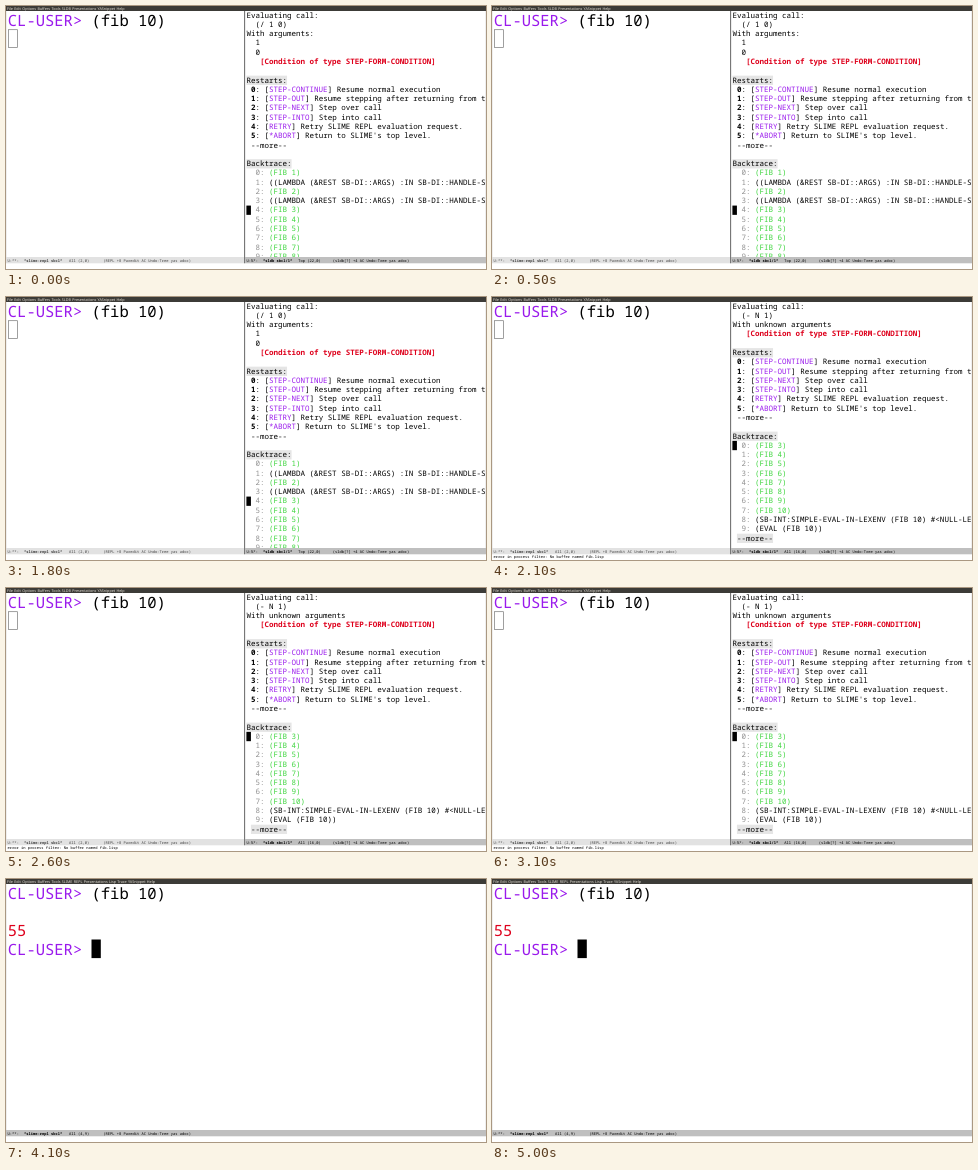
Recreate the animation shown at these times as an HTML page. Size 480 px wide and 263 px high, loop 5100 ms.

```html
<!DOCTYPE html>
<html lang="en">
<head>
<meta charset="utf-8">
<title>Stepping through fib</title>
<style>
  html, body { margin: 0; width: 100%; height: 100%; overflow: hidden; background: #fff; }
  svg { display: block; width: 480px; height: 263px; }
  text { font-family: "Noto Sans Mono", "DejaVu Sans Mono", monospace; text-rendering: geometricPrecision; fill: #000; }
  .repl { font-size: 15.5px; }
  .pane { font-size: 7.53px; }
  .mode { font-size: 3.75px; }
  .menu { font-family: "Noto Sans", "Open Sans", sans-serif; font-size: 3.72px; word-spacing: 0.35px; fill: #dfdbd2; }
  .bold { font-weight: 600; }
  .purple { fill: #9a1aec; }
  .red { fill: #de001c; }
  .green { fill: #3fd53f; }
  .gray { fill: #909090; }
  .dim { fill: #444; }

  .scene { visibility: hidden; animation: 5100ms step-end infinite; }
  #call { animation-name: call; }
  #args { animation-name: args; }
  #done { animation-name: done; }
  @keyframes call { 0% { visibility: visible } 41.17% { visibility: hidden } }
  @keyframes args { 0% { visibility: hidden } 41.17% { visibility: visible } 64.7% { visibility: hidden } }
  @keyframes done { 0% { visibility: hidden } 64.7% { visibility: visible } }
</style>
</head>
<body>
<svg viewBox="0 0 480 263">
  <defs><clipPath id="edge"><rect x="240" y="4" width="239" height="247"/></clipPath></defs>
  <rect width="480" height="263" fill="#fff"/>
  <g id="call" class="scene"></g>
  <g id="args" class="scene"></g>
  <g id="done" class="scene"></g>
</svg>
<script>
const TOP = 4.7;
const REPL = { x: 1.8, adv: 9.3, pitch: 18.6, base: 15, cls: 'repl' };
const PANE = { x: 240.4, adv: 4.518, pitch: 9.28, base: 6.9, cls: 'pane' };

function add(parent, tag, attrs, content) {
  const el = document.createElementNS('http://www.w3.org/2000/svg', tag);
  for (const key in attrs) el.setAttribute(key, attrs[key]);
  if (content) el.textContent = content;
  return parent.appendChild(el);
}

const rect = (g, x, y, width, height, fill, more) =>
  add(g, 'rect', { x, y, width, height, fill, ...more });

const label = (g, x, y, str, cls) => add(g, 'text', { x, y, class: cls }, str);

// Places text on a character grid.
const put = (g, grid, col, row, str, cls = '') =>
  label(g, grid.x + col * grid.adv, TOP + row * grid.pitch + grid.base, str, grid.cls + ' ' + cls);

// Fills a run of character cells.
const cells = (g, grid, col, row, count, fill) =>
  rect(g, grid.x + col * grid.adv, TOP + row * grid.pitch, count * grid.adv, grid.pitch, fill);

function menuBar(g, modeMenus) {
  rect(g, 0, 0, 480, 5, '#3c3b37');
  label(g, 1, 3.8, `File Edit Options Buffers Tools ${modeMenus} YASnippet Help`, 'menu');
}

function modeLine(g, x, width, active, { flags, name, place, placeX, modes, modesX }) {
  rect(g, x, 251, width, 6.3, active ? '#bfbfbf' : '#e2e2e2');
  const tone = active ? '' : ' dim';
  label(g, x + 1.5, 255.5, flags, 'mode' + tone);
  label(g, x + 18, 255.5, name, 'mode bold' + tone);
  label(g, x + placeX, 255.5, place, 'mode' + tone);
  label(g, x + modesX, 255.5, modes, 'mode' + tone);
}

const replLine = (g, width, active, place) => modeLine(g, 0, width, active, {
  flags: 'U:**-', name: '*slime-repl sbcl*', place, placeX: 63,
  modes: '(REPL +8 Paredit AC Undo-Tree yas adoc)', modesX: 97.3
});

function prompt(g, row, input) {
  put(g, REPL, 0, row, 'CL-USER>', 'purple');
  if (input) put(g, REPL, 9, row, input);
}

function heading(g, row, str) {
  cells(g, PANE, 0, row, str.length, '#e5e5e5');
  put(g, PANE, 0, row, str);
}

const restarts = [
  ['STEP-CONTINUE', 'Resume normal execution'],
  ['STEP-OUT', 'Resume stepping after returning from t'],
  ['STEP-NEXT', 'Step over call'],
  ['STEP-INTO', 'Step into call'],
  ['RETRY', 'Retry SLIME REPL evaluation request.'],
  ['*ABORT', "Return to SLIME's top level."]
];

function debuggerScene(id, { intro, frames, current, place, more }) {
  const g = document.getElementById(id);
  prompt(g, 0, '(fib 10)');
  rect(g, 2.4, 23.7, 9, 17.8, 'none', { stroke: '#777', 'stroke-width': 0.7 });

  const pane = add(g, 'g', { 'clip-path': 'url(#edge)' });
  intro.forEach(([col, str], row) => put(pane, PANE, col, row, str));
  let row = intro.length;
  put(pane, PANE, 3, row, '[Condition of type STEP-FORM-CONDITION]', 'red bold');

  row += 2;
  heading(pane, row++, 'Restarts:');
  restarts.forEach(([name, text], i) => {
    put(pane, PANE, 1, row, String(i), 'bold');
    put(pane, PANE, 2, row, ': [');
    put(pane, PANE, 5, row, name, 'purple');
    put(pane, PANE, 5 + name.length, row++, '] ' + text);
  });
  put(pane, PANE, 1, row, '--more--');

  row += 2;
  heading(pane, row++, 'Backtrace:');
  cells(pane, PANE, 0, row + current, 1, '#000');
  frames.forEach((text, i) => {
    put(pane, PANE, 2, row, i + ':', 'gray');
    put(pane, PANE, 5, row++, text, text.startsWith('(FIB') ? 'green' : '');
  });
  if (more) {
    cells(pane, PANE, 1, row, 8, '#e5e5e5');
    put(pane, PANE, 1, row, '--more--');
  }

  rect(g, 0, 5, 0.8, 246, '#ececec');
  rect(g, 238, 5, 1, 252.3, '#777');
  rect(g, 239, 5, 1, 246, '#ececec');
  rect(g, 479.2, 5, 0.8, 246, '#ececec');
  menuBar(g, 'SLDB Presentations');
  replLine(g, 238, false, 'All (2,0)');
  modeLine(g, 239, 241, true, {
    flags: 'U:%*-', name: '*sldb sbcl/1*', place, placeX: 53.3,
    modes: '(sldb[?] +4 AC Undo-Tree yas adoc)', modesX: 87.7
  });
  return g;
}

const fib = n => `(FIB ${n})`;
const fibs = (from, to) => Array.from({ length: to - from + 1 }, (_, i) => fib(from + i));
const lambda = '((LAMBDA (&REST SB-DI::ARGS) :IN SB-DI::HANDLE-S';

debuggerScene('call', {
  intro: [[0, 'Evaluating call:'], [2, '(/ 1 0)'], [0, 'With arguments:'], [2, '1'], [2, '0']],
  frames: [fib(1), lambda, fib(2), lambda, ...fibs(3, 8)],
  current: 4,
  place: 'Top (22,0)'
});

const args = debuggerScene('args', {
  intro: [[0, 'Evaluating call:'], [2, '(- N 1)'], [0, 'With unknown arguments']],
  frames: [...fibs(3, 10), '(SB-INT:SIMPLE-EVAL-IN-LEXENV (FIB 10) #<NULL-LE', '(EVAL (FIB 10))'],
  current: 0,
  place: 'All (16,0)',
  more: true
});
label(args, 1.5, 261.4, 'error in process filter: No buffer named fib.lisp', 'mode');

const done = document.getElementById('done');
menuBar(done, 'SLIME REPL Presentations Lisp Trace');
rect(done, 0, 5, 0.8, 246, '#ececec');
rect(done, 479.2, 5, 0.8, 246, '#ececec');
prompt(done, 0, '(fib 10)');
put(done, REPL, 0, 2, '55', 'red');
prompt(done, 3);
cells(done, REPL, 9, 3, 1, '#000');
replLine(done, 480, true, 'All (4,9)');
</script>
</body>
</html>
```
